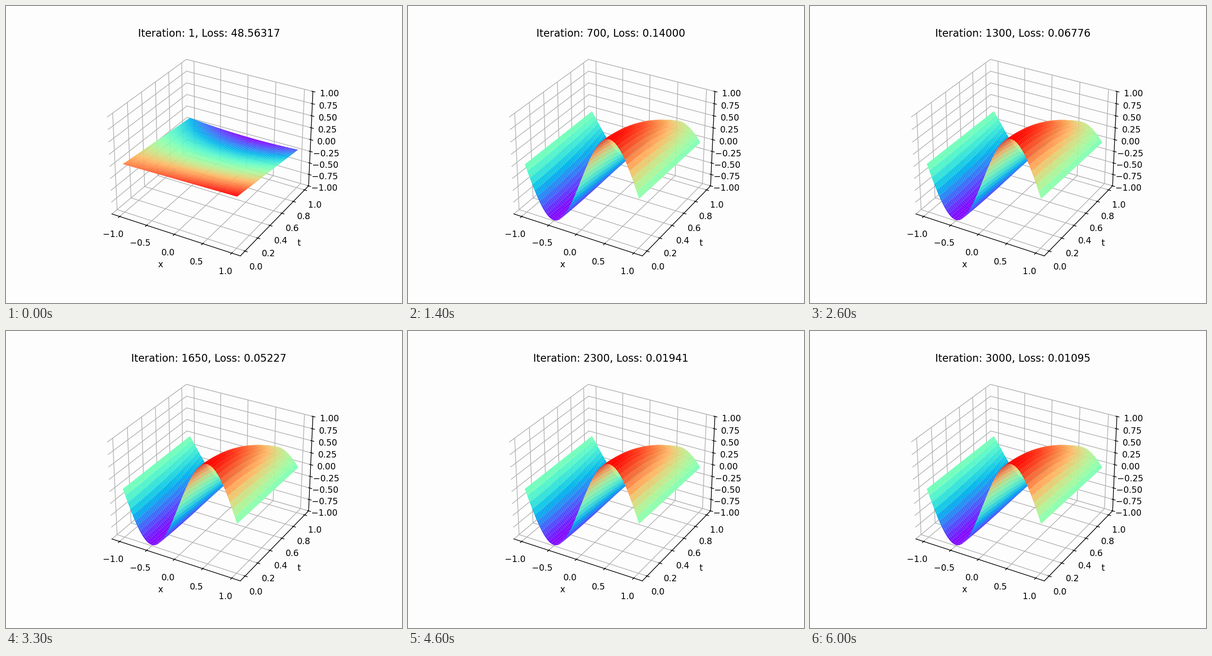
A matplotlib script for the animation above (6.1 s loop, 864 by 648 pixels).

```python
import numpy as np
import matplotlib.pyplot as plt
from matplotlib.animation import FuncAnimation

FRAMES = 61
STEP = 50
FORMED = 350
BACK = "#fdfdfd"

# A few points of the loss curve, joined on log scales
LOSS = {1: 48.56317, 350: 0.32932, 1000: 0.09015, 1650: 0.05227,
        2300: 0.01941, 2700: 0.01589, 3000: 0.01095}

X, T = np.meshgrid(np.linspace(-1, 1, 50), np.linspace(0, 1, 50))
RIGHT = (X + 1) / 2


def lerp(a, b, w):
    return a + (b - a) * w


def untrained():
    near = 0.038 + 0.0225 * X
    far = -0.205 - 0.02 * X + 0.048 * X**2
    return lerp(near, far, T)


def trained(settled):
    """Fading sine, pulled down in the middle, with a small edge error."""
    odd = lerp(0.44, 0.50, settled) * T ** lerp(1.8, 2, settled)
    even = lerp(0.38, 0.40, settled) * T**1.5
    wave = np.sin(np.pi * X) * (1 - odd) - even * (1 - X**2) ** 2
    left = lerp(-0.02, 0.02, settled) * (1 - T / 2)
    right = 0.015 - 0.04 * T
    return wave + lerp(left, right, RIGHT)


def surface(it):
    z = trained(np.clip((it - FORMED) / 450, 0, 1))
    if it < FORMED:
        rise = np.expm1((1 - it) / 90) / np.expm1((1 - FORMED) / 90)
        z = lerp(untrained(), z, rise)
    return z


def loss(it):
    its, values = np.log(list(LOSS)), np.log(list(LOSS.values()))
    return np.exp(np.interp(np.log(it), its, values))


fig = plt.figure(figsize=(6.4, 4.8), dpi=135, facecolor=BACK)
ax = fig.add_subplot(projection="3d", facecolor=BACK)
pad = 1.1 / 48
ax.set_xlim(-1.1 - 2 * pad, 1.1 + 2 * pad)
ax.set_ylim(-0.05 - pad, 1.05 + pad)
ax.set_zlim(-1, 1)
ax.set_xlabel("x")
ax.set_ylabel("t")
for axis in (ax.xaxis, ax.yaxis, ax.zaxis):
    axis.pane.fill = False

shown = []


def update(i):
    while shown:
        shown.pop().remove()
    it = max(1, i * STEP)
    shown.append(ax.plot_surface(X, T, surface(it), cmap="rainbow", linewidth=0))
    ax.set_title(f"Iteration: {it}, Loss: {loss(it):.5f}")
    return shown


anim = FuncAnimation(fig, update, frames=FRAMES, init_func=lambda: update(0),
                     interval=100, repeat=True, blit=False)
plt.show()
```
